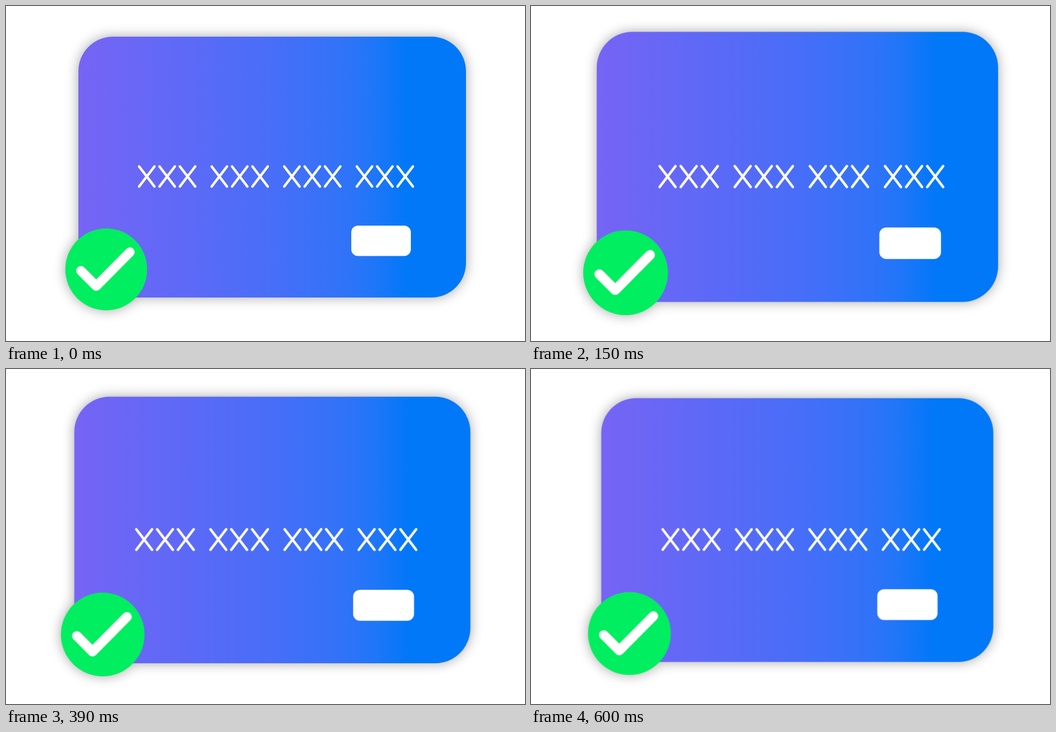
An HTML page that plays this animation: 932 by 601 pixels, repeating every 800 ms.

```html
<!DOCTYPE html>
<html lang="en">
<head>
<meta charset="utf-8">
<title>Card approved</title>
<style>
  html, body { margin: 0; width: 100%; height: 100%; overflow: hidden; background: #fff; }
  svg { display: block; width: 932px; height: 601px; }

  .pulse {
    transform-origin: 466px 300.5px;
    animation: pulse 800ms infinite;
  }

  /* Each segment advances in 30 ms steps, then the last pose holds. */
  @keyframes pulse {
    0%     { transform: scale(1);      animation-timing-function: steps(2); }
    7.5%   { transform: scale(1.0156); animation-timing-function: steps(3); }
    18.75% { transform: scale(1.0355); animation-timing-function: steps(5); }
    37.5%  { transform: scale(1.0264); animation-timing-function: steps(10); }
    75%, 100% { transform: scale(1.0116); }
  }

  .digits { fill: none; stroke: #fff; stroke-width: 4.4; stroke-linecap: round; }
  .tick { fill: none; stroke: #fff; stroke-width: 17; stroke-linecap: round; stroke-linejoin: round; }
</style>
</head>
<body>
<svg viewBox="0 0 932 601">
  <defs>
    <linearGradient id="blue">
      <stop offset="0" stop-color="#7764f5"/>
      <stop offset=".5" stop-color="#486ef8"/>
      <stop offset=".68" stop-color="#3173f8"/>
      <stop offset=".76" stop-color="#2076f8"/>
      <stop offset=".85" stop-color="#0078f8"/>
    </linearGradient>
    <filter id="shadow" filterUnits="userSpaceOnUse" x="40" y="0" width="852" height="601" color-interpolation-filters="sRGB">
      <feDropShadow dx="0" dy="0" stdDeviation="11" flood-color="#000" flood-opacity=".35"/>
    </filter>
    <path id="x" d="M-13.8-18 13.8 18M13.8-18-13.8 18"/>
    <g id="xxx">
      <use href="#x"/>
      <use href="#x" x="36.6"/>
      <use href="#x" x="73.2"/>
    </g>
  </defs>

  <g class="pulse">
    <g filter="url(#shadow)">
      <rect x="130" y="55" width="696" height="468" rx="62" fill="url(#blue)"/>
      <circle cx="180" cy="472.5" r="73.5" fill="#00ee5f"/>
    </g>
    <path class="tick" d="M134.5 475 162 502.5 222.5 441.5"/>
    <g class="digits" transform="translate(252.8 305.8)" role="img" aria-label="XXX XXX XXX XXX">
      <use href="#xxx"/>
      <use href="#xxx" x="130.3"/>
      <use href="#xxx" x="260.6"/>
      <use href="#xxx" x="390.9"/>
    </g>
    <rect x="620" y="394" width="107" height="54.5" rx="12" fill="#fff"/>
  </g>
</svg>
</body>
</html>
```
